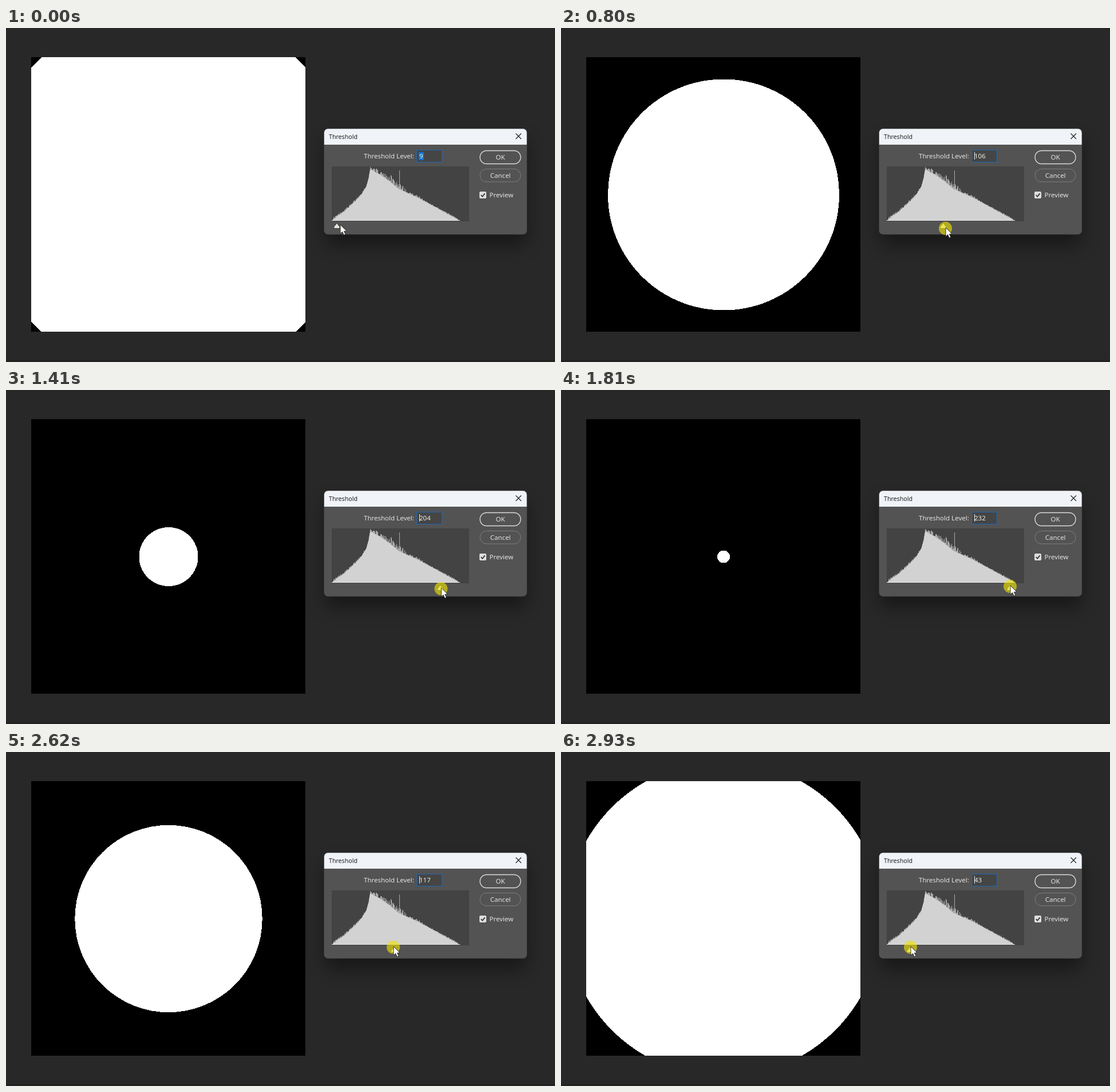
Recreate the animation shown at these times as an HTML page. Size 959 by 584 pixels, loop 3.03 s.

```html
<!DOCTYPE html>
<html lang="en">
<head>
<meta charset="utf-8">
<title>Threshold</title>
<style>
  html, body { margin: 0; width: 100%; height: 100%; overflow: hidden; background: #282828; }
  svg { display: block; width: 959px; height: 584px; }
  text { font: 11.5px "Noto Sans", "Open Sans", sans-serif; fill: #e2e2e2; }
  .title { font-size: 10.7px; font-family: "Open Sans", "Noto Sans", sans-serif; fill: #111; }
  .mid { text-anchor: middle; }
</style>
</head>
<body>
<svg viewBox="0 0 959 584" xmlns="http://www.w3.org/2000/svg">
  <defs>
    <clipPath id="canvasClip"><rect x="44" y="51" width="479" height="480"/></clipPath>
    <clipPath id="dialogClip"><rect x="555.5" y="176" width="354.5" height="185" rx="7"/></clipPath>
    <filter id="blur" x="-30%" y="-40%" width="160%" height="180%"><feGaussianBlur stdDeviation="16"/></filter>
  </defs>
  <rect width="959" height="584" fill="#282828"/>
  <rect y="580" width="959" height="4" fill="#232323"/>

  <g clip-path="url(#canvasClip)" shape-rendering="crispEdges">
    <rect x="44" y="51" width="479" height="480"/>
    <circle id="disc" cx="284" cy="291.5" fill="#fff"/>
  </g>

  <rect x="558" y="194" width="350" height="185" rx="8" fill="#000" opacity=".42" filter="url(#blur)"/>
  <g clip-path="url(#dialogClip)">
    <rect x="555" y="176" width="356" height="186" fill="#535353"/>
    <rect x="555" y="176" width="356" height="28" fill="#f0f3f8"/>
  </g>
  <rect x="555.5" y="176" width="354.5" height="185" rx="7" fill="none" stroke="#3a3a3a" stroke-opacity=".6"/>
  <text class="title" x="564" y="194">Threshold</text>
  <path d="M890.5 184.5l9.5 9.5m0-9.5l-9.5 9.5" stroke="#1a1a1a" stroke-width="1.1"/>

  <text x="625" y="228">Threshold Level:</text>
  <rect x="717.5" y="213.5" width="44" height="21" fill="#454545" stroke="#1b6ab8"/>
  <rect id="selection" x="721" y="217" width="9" height="14" fill="#0f74d0"/>
  <text id="value" x="722" y="228" style="fill:#ecece0"></text>
  <path id="caret" d="M722.5 217v13" stroke="#eee"/>

  <rect x="828" y="214.5" width="71" height="23" rx="11.5" fill="none" stroke="#dcdcdc" stroke-width="1.4"/>
  <text class="mid" x="863.5" y="230">OK</text>
  <rect x="828" y="246.5" width="71" height="22.5" rx="11.25" fill="none" stroke="#7e7e7e"/>
  <text class="mid" x="863.7" y="262">Cancel</text>
  <rect x="827" y="286" width="12" height="12" rx="2" fill="#dedede"/>
  <path d="M829.7 292l2.5 2.7 4.3-5.3" fill="none" stroke="#333" stroke-width="1.8"/>
  <text x="844.5" y="296">Preview</text>

  <rect x="569" y="242" width="240" height="96" fill="#434343"/>
  <path id="noise" stroke="#a9a9a9" shape-rendering="crispEdges"/>
  <path id="hill" fill="#d2d2d2"/>
  <path d="M569 336.5H793" stroke="#e6e6e6"/>

  <path id="slider" d="M-5 4.5V1.5L0-4.8 5 1.5V4.5Z" fill="#dfe7dc" stroke="#303030" stroke-width=".9"/>
  <circle id="press" r="11.5" cx="-.5" cy="1.3" fill="#f0e400" fill-opacity=".62"/>
  <path id="cursor" d="M0 0V15.5L3.6 12.2 6.2 18 8.9 16.8 6.4 11.3 11 11Z" fill="#fff" stroke="#222" stroke-width=".9"/>
</svg>
<script>
const $ = id => document.getElementById(id);
const LOOP = 3030;

// [step, level, disc radius, pointer x, pointer y]
const KEYS = [
  [0, 9, 326.6, 584, 344], [1, 9, 326.6, 582, 345], [3, 14, 321, 586, 346],
  [5, 32, 298, 602, 347], [6, 45, 278.5, 614, 347], [8, 106, 202, 672, 349],
  [11, 169, 99.7, 728, 349], [12, 181, 82.5, 739, 348], [15, 216, 36, 771, 345],
  [18, 232, 11, 785, 342], [19, 233, 11, 785.4, 342], [20, 232, 11, 785, 342],
  [21, 232, 11, 785, 342], [22, 231, 11, 784, 342], [23, 225, 16, 780, 341],
  [24, 207, 41, 763, 340], [25, 157, 108, 715, 340], [26, 117, 163.7, 677, 340],
  [27, 76, 216.5, 641, 340], [28, 55, 254, 622, 340], [29, 43, 275.8, 611, 340]
];

// Piecewise-linear lookup: rows are sorted by their first entry.
function sample(rows, x) {
  const hi = rows.findIndex(row => row[0] >= x);
  if (hi < 1) return rows[hi ? rows.length - 1 : 0];
  const a = rows[hi - 1], b = rows[hi], k = (x - a[0]) / (b[0] - a[0]);
  return a.map((v, i) => v + (b[i] - v) * k);
}

function drawHistogram() {
  const slope = [[569, 337], [575, 332], [590, 321], [605, 308], [620, 292], [629, 278],
    [633, 265], [636, 247], [640, 249], [654, 257], [670, 268], [685, 281],
    [700, 288], [722, 298], [760, 319], [793, 337]];
  let seed = 17;
  const random = () => (seed = seed * 16807 % 2147483647) / 2147483647;
  let bars = "";
  for (let x = 570; x < 790; x++) {
    const y = sample(slope, x)[1];
    const reach = x < 636 ? 4 : x < 665 ? 7 : x < 698 ? 13 : x < 730 ? 4 : 2;
    const top = x === 687 ? 249 : x === 636 ? 243 : Math.max(245, y - reach * random());
    bars += `M${x + .5} ${Math.round(top)}V337`;
  }
  $("noise").setAttribute("d", bars);
  $("hill").setAttribute("d", "M" + slope.join("L") + "Z");
}

// Steps last 100 ms, with three that last 110 ms.
function stepAt(ms) {
  const start = i => i * 100 + 10 * ((i > 8) + (i > 18) + (i > 27));
  let step = 29;
  while (step && start(step) > ms) step--;
  return step;
}

function render(ms) {
  const step = stepAt(ms);
  const [, level, radius, x, y] = sample(KEYS, step);
  const move = (id, px, py) => $(id).setAttribute("transform", `translate(${px} ${py})`);
  const show = (id, on) => $(id).setAttribute("visibility", on ? "visible" : "hidden");
  const dragging = step > 0;
  $("disc").setAttribute("r", radius);
  $("value").textContent = Math.round(level);
  move("slider", 569.6 + level * .925, 346);
  move("press", x, y);
  move("cursor", x, y);
  show("press", dragging);
  show("caret", dragging);
  show("selection", !dragging);
}

drawHistogram();
const origin = performance.now();
function tick() {
  render((performance.now() - origin) % LOOP);
  requestAnimationFrame(tick);
}
tick();
</script>
</body>
</html>
```
